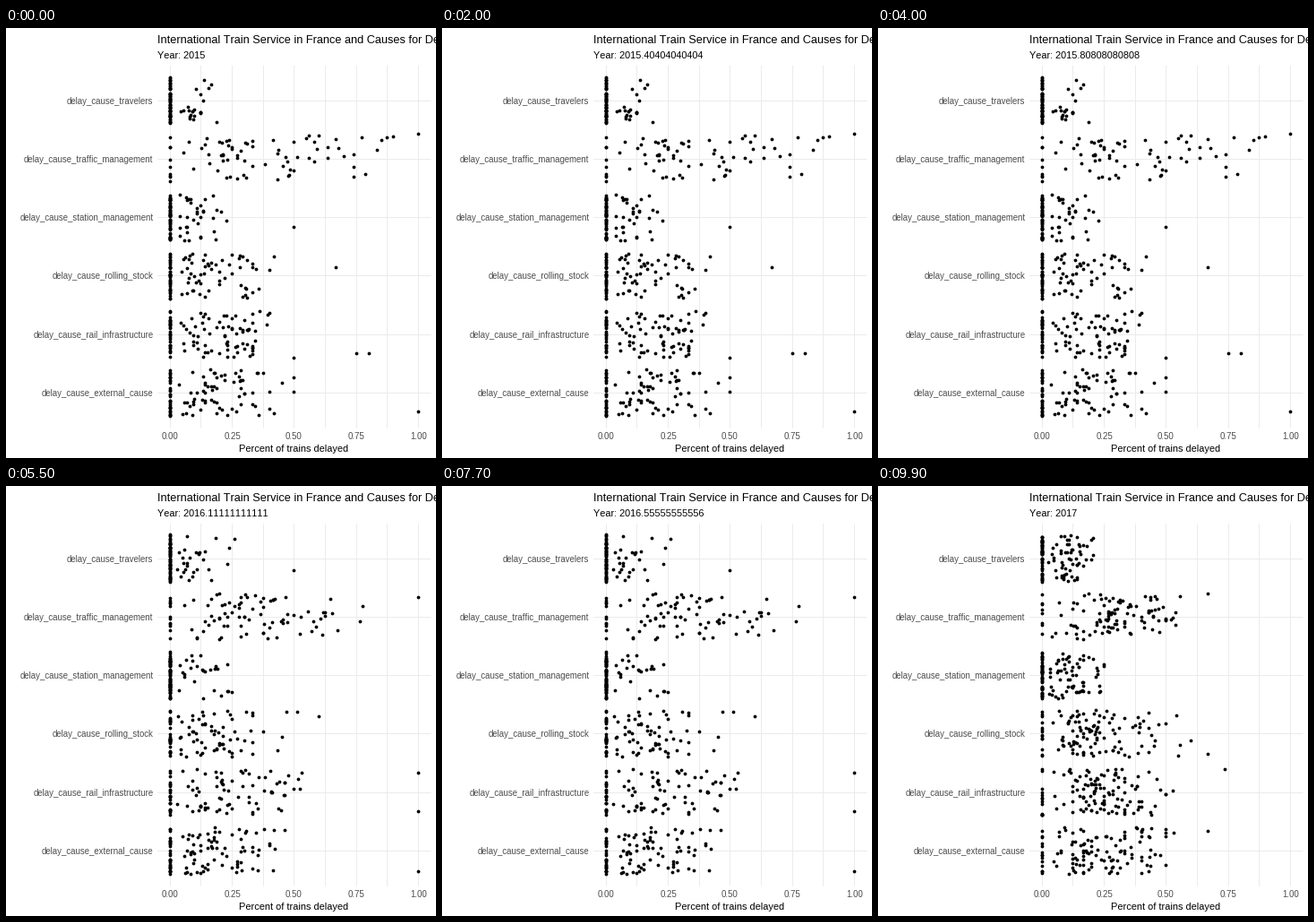
Recreate the animation shown at these times as a matplotlib script. Size 480 by 480 pixels, loop 10000 ms.

```python
import matplotlib.pyplot as plt
import numpy as np
from matplotlib.animation import FuncAnimation

SIZE, DPI = 480, 72
FRAMES, INTERVAL = 100, 100
FIRST_YEAR, LAST_YEAR = 2015, 2017
X0, X_UNIT = 183.1, 277.5        # pixel position of 0 and width of 1.0
ROW0, ROW_STEP = 81, 65.3        # first category line and spacing
LEFT, RIGHT = X0 - 0.05 * X_UNIT, X0 + 1.05 * X_UNIT
TOP, BOTTOM = ROW0 - 0.6 * ROW_STEP, ROW0 + 5.6 * ROW_STEP
JITTER = 0.4
GRID, LABEL = "#ebebeb", "#4d4d4d"

# Per cause and year: points at zero, delayed points, their mode and maximum
CAUSES = {
    "travelers": [(60, 22, .05, .22), (60, 28, .05, .28), (52, 58, .08, .24)],
    "traffic_management": [(9, 70, .20, .95), (12, 80, .25, .85), (8, 100, .25, .58)],
    "station_management": [(52, 34, .05, .25), (65, 26, .05, .34), (48, 65, .06, .28)],
    "rolling_stock": [(38, 58, .08, .45), (30, 65, .08, .52), (14, 105, .15, .60)],
    "rail_infrastructure": [(30, 75, .12, .52), (24, 72, .12, .60), (14, 110, .22, .55)],
    "external_cause": [(32, 68, .12, .52), (30, 75, .12, .50), (14, 105, .18, .55)],
}

# Extremes per year: cause row (with its jitter) and share
EXTREMES = [
    [(0.58, 1), (5.32, 1), (2.85, 2 / 3), (4.32, .8), (4.32, .75), (2.17, .5)],
    [(0.67, 1), (3.67, 1), (4.32, 1), (5.35, 1), (2.70, .6), (0.21, .5)],
    [(0.61, 2 / 3), (3.35, 2 / 3), (3.60, .735), (4.66, 2 / 3)],
]


def col(share):
    return X0 + share * X_UNIT


def row(i):
    return ROW0 + i * ROW_STEP


def make_points(k):
    rng = np.random.default_rng(FIRST_YEAR + k)
    rows, shares = map(list, zip(*EXTREMES[k]))
    for i, mix in enumerate(CAUSES.values()):
        zeros, late, mode, top = mix[k]
        trains = rng.integers(6, 40, late)
        share = np.round(rng.triangular(.02, mode, top, late) * trains) / trains
        shares += [0] * zeros + list(np.maximum(share, 1 / trains))
        rows += list(i + rng.uniform(-JITTER, JITTER, zeros + late))
    return np.floor(np.column_stack([col(np.array(shares)), row(np.array(rows))]))


def line(x, y):
    ax.plot(x, y, color=GRID, lw=1, snap=False, solid_capstyle="butt", zorder=1)


def text(x, y, s, size, color="black", ha="left"):
    return ax.text(x, y, s, fontsize=size, color=color, ha=ha, va="baseline")


plt.rcParams["font.family"] = "Liberation Sans"
plt.rcParams["text.kerning_factor"] = 6  # practically no kerning
fig = plt.figure(figsize=(SIZE / DPI, SIZE / DPI), dpi=DPI, facecolor="white")
ax = fig.add_axes([0, 0, 1, 1])
ax.set_xlim(0, SIZE)
ax.set_ylim(SIZE, 0)
ax.axis("off")

for k in range(9):
    x = int(col(k / 8)) + 0.5
    line([x, x], [TOP, BOTTOM])
    if k % 2 == 0:
        text(x, 459, f"{k / 8:.2f}", 9.7, LABEL, "center")
for i, cause in enumerate(CAUSES):
    y = int(row(i)) + 0.5
    line([LEFT, RIGHT], [y, y])
    text(164.5, y + 3.5, f"delay_cause_{cause}", 9.6, LABEL, "right")

text(LEFT, 17, "International Train Service in France and Causes for Delays", 12.8)
text((LEFT + RIGHT) / 2 - 1, 473, "Percent of trains delayed", 10.95, ha="center")
subtitle = text(LEFT, 34, "", 10.85)

points = [make_points(k) for k in range(LAST_YEAR - FIRST_YEAR + 1)]
dots = ax.scatter([], [], s=3.8 ** 2, c="black", linewidths=0,
                  antialiased=False, snap=False, zorder=2)


def update(i):
    year = FIRST_YEAR + (LAST_YEAR - FIRST_YEAR) * i / (FRAMES - 1)
    subtitle.set_text(f"Year: {year:.15g}")
    dots.set_offsets(points[int(year) - FIRST_YEAR])
    return subtitle, dots


anim = FuncAnimation(fig, update, frames=FRAMES, interval=INTERVAL,
                     init_func=lambda: update(0), repeat=True, repeat_delay=0)
plt.show()
```
